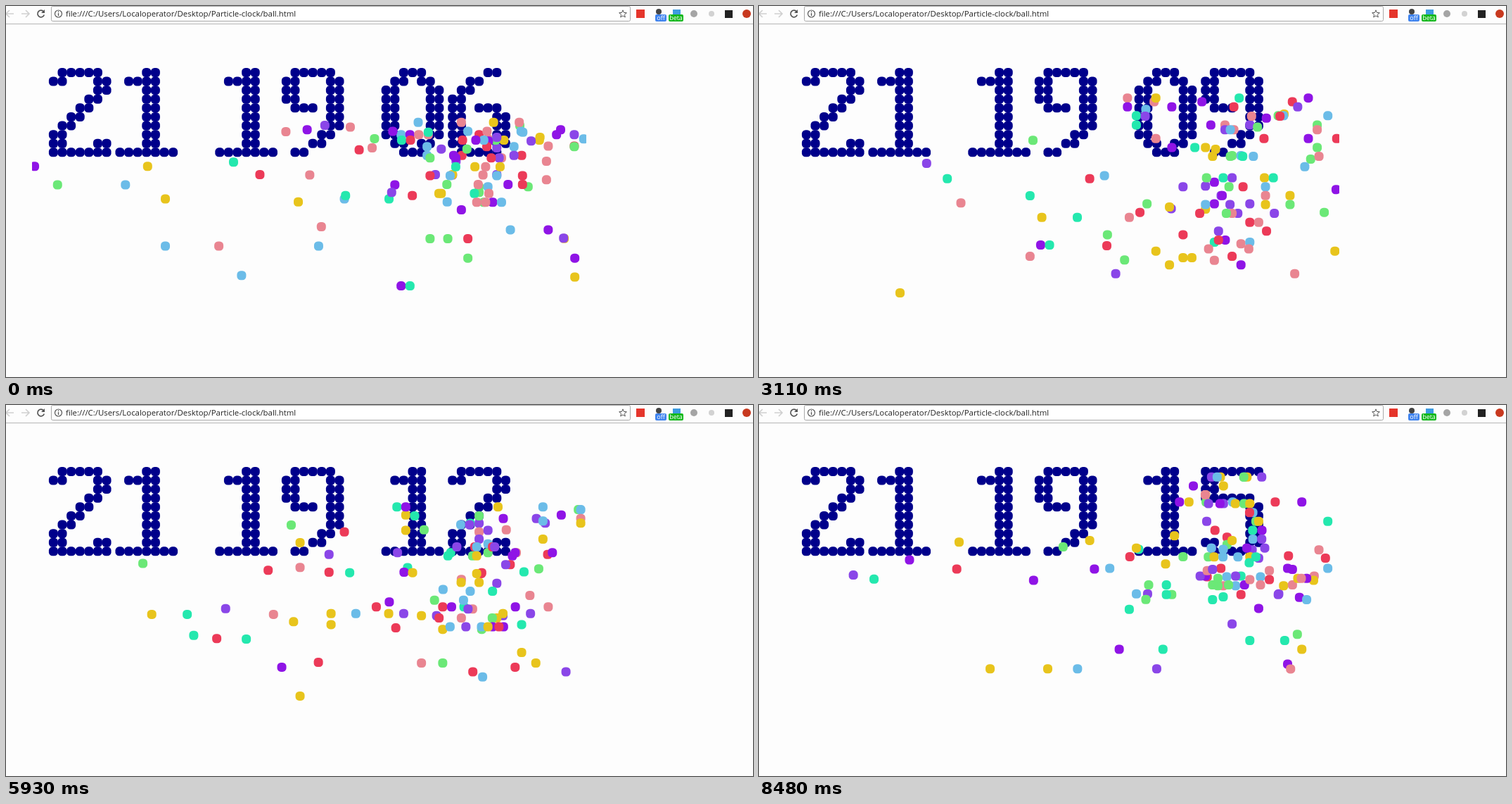
These frames come from a looping animation (1062x527 px, 8.58 s). An HTML page with a canvas:

```html
<!DOCTYPE html>
<html lang="en">
<head>
<meta charset="utf-8">
<title>Particle clock</title>
<style>
  html, body { margin: 0; width: 100%; height: 100%; overflow: hidden; background: #fdfdfd; }
  canvas, svg { position: absolute; left: 0; top: 0; display: block; }
  text { font-family: "Open Sans", "Noto Sans", sans-serif; }
</style>
</head>
<body>
<canvas id="stage" width="1062" height="527"></canvas>
<svg width="1062" height="27" viewBox="0 0 1062 27" fill="none">
  <path d="M0 25.5H1062" stroke="#b6b6b6"/>
  <rect x="64.5" y="0.5" width="823" height="21" rx="2" fill="#fff" stroke="#a9a9a9"/>
  <g stroke="#d0d0d0" stroke-width="1.6">
    <path d="M11 11H0M5 6L0 11L5 16"/>
    <path d="M22 11H33M28 6L33 11L28 16"/>
  </g>
  <path d="M53.5 8A4.8 4.8 0 1 0 54.3 12.5" stroke="#555" stroke-width="1.7"/>
  <path d="M55 5V10H50Z" fill="#555"/>
  <circle cx="74.5" cy="11" r="5" stroke="#555" stroke-width="1.2"/>
  <path d="M74.5 10V14M74.5 7.6V9" stroke="#555" stroke-width="1.3"/>
  <text x="85" y="15" font-size="11.4" fill="#222">file:///C:/Users/Localoperator/Desktop/Particle-clock/ball.html</text>
  <path d="M877 5.8L878.5 9.4L882.3 9.7L879.4 12.2L880.3 15.9L877 13.9L873.7 15.9L874.6 12.2L871.7 9.7L875.5 9.4Z" stroke="#555"/>
  <rect x="896" y="5" width="12" height="12" fill="#e5352b"/>
  <circle cx="928" cy="8" r="4" fill="#444"/>
  <rect x="948" y="5" width="11" height="7" fill="#3d9be0"/>
  <rect x="923" y="12" width="16" height="10" rx="2" fill="#3f83ee"/>
  <rect x="942" y="12" width="21" height="10" rx="2" fill="#13b81c"/>
  <g fill="#fff" font-size="9" text-anchor="middle">
    <text x="931" y="20">off</text>
    <text x="952.5" y="20">beta</text>
  </g>
  <circle cx="978" cy="11" r="5" fill="#a5a5a5"/>
  <circle cx="1003" cy="11" r="4" fill="#d2d2d2"/>
  <rect x="1022" y="6" width="11" height="11" fill="#222"/>
  <circle cx="1053" cy="11" r="6" fill="#c8391f"/>
</svg>
<script>
const ctx = document.getElementById('stage').getContext('2d');
const LOOP = 8580, SCALE = 0.788, PITCH = 16 * SCALE;
const LEFT = 67.4, TOP = 94.4;
const STEP_MS = 48.5, STEPS_PER_SEC = 20, FIRST_STEP = 135.25;
const GRAVITY = 2, BOUNCE = 0.9, FLOOR = 372, MAX_AGE = 200;
const COLORS = ['#ec3a58', '#e98591', '#8f14e6', '#8a46e8', '#6bbce8', '#6be877', '#24e8ae', '#e8c41c'];

// Digits as strokes of a brush two dots wide; each corner is column, row.
const DIGITS = [
  '20 02 07 29 39 57 52 30 20',
  '11 31,30 39,09 59',
  '01 10 40 51 52 07 09 59 58',
  '00 50 51 33 24 34 56 58 49 19 08',
  '49 40 04 05 55,39 59',
  '50 00 03 43 54 58 49 19 08',
  '40 40,21 03 08 19 49 58 55 44 34',
  '01 00 50 51 42 43 34 35 26 29',
  '44 53 51 40 10 01 03 14 44 55 58 49 19 08 05 14',
  '24 14 03 01 10 40 51 56 38,19 19'
].map(toDots);

function toDots(strokes) {
  const dots = new Set();
  for (const stroke of strokes.split(',')) {
    const points = stroke.split(' ').map(p => [...p].map(Number));
    for (let i = 1; i < points.length; i++) {
      const [x, y] = points[i - 1], dx = points[i][0] - x, dy = points[i][1] - y;
      const n = Math.max(Math.abs(dx), Math.abs(dy));
      for (let k = 0; k <= n; k++) {
        const f = n ? k / n : 0, cell = (y + dy * f) * 7 + x + dx * f;
        dots.add(cell).add(cell + 1);
      }
    }
  }
  return [...dots].sort((a, b) => a - b).map(cell => ({ row: Math.floor(cell / 7), col: cell % 7 }));
}

let seed = 2119;
function random() {
  seed = seed + 0x6d2b79f5 | 0;
  let h = Math.imul(seed ^ seed >>> 15, 1 | seed);
  h = h + Math.imul(h ^ h >>> 7, 61 | h) ^ h;
  return ((h ^ h >>> 14) >>> 0) / 4294967296;
}

const dotX = (slot, col) => LEFT + ((slot >> 1) * 18.75 + (slot & 1) * 7.5 + col) * PITCH;
const dotY = row => TOP + row * PITCH;

// Height per step for a ball thrown from a given row.
function makePath(row) {
  const path = [];
  let y = row * 16, v = -8;
  for (let i = 0; i <= MAX_AGE; i++) {
    path.push(TOP + y * SCALE);
    y += v;
    v += GRAVITY;
    if (y >= FLOOR && v > 0) v *= -BOUNCE;
  }
  return path;
}
const paths = Array.from({ length: 10 }, (_, row) => makePath(row));

// Sideways motion builds up over the first few steps.
const drift = age => age - 6 * (1 - Math.exp(-age / 6));

const balls = [];
function throwDigit(slot, digit, sec) {
  for (const { row, col } of DIGITS[digit]) balls.push({
    x: dotX(slot, col),
    path: paths[row],
    born: sec * STEPS_PER_SEC,
    vx: (Math.floor(random() * 9) - 4) * 0.84,
    life: 35 + random() ** 2 * (MAX_AGE - 35),
    color: COLORS[Math.floor(random() * COLORS.length)]
  });
}
for (let sec = 0; sec <= 15; sec++) {
  if (sec === 0) throwDigit(3, 9, sec);
  if (sec % 10 === 0) throwDigit(4, sec / 10, sec);
  throwDigit(5, sec % 10, sec);
}

function dot(x, y, color) {
  ctx.fillStyle = color;
  ctx.beginPath();
  ctx.roundRect(x - 6.5, y - 6.5, 13, 13, 5.2);
  ctx.fill();
}

function draw(t) {
  const step = Math.floor(FIRST_STEP + t / STEP_MS);
  const sec = Math.floor(step / STEPS_PER_SEC);
  ctx.clearRect(0, 0, 1062, 527);
  ctx.save();
  ctx.beginPath();
  ctx.rect(37, 27, 788, 399);
  ctx.clip();
  [2, 1, 1, 9, Math.floor(sec / 10), sec % 10].forEach((digit, slot) => {
    for (const { row, col } of DIGITS[digit]) dot(dotX(slot, col), dotY(row), '#00008b');
  });
  for (const b of balls) {
    const age = step - b.born;
    if (age >= 0 && age < b.life) dot(b.x + b.vx * drift(age), b.path[age], b.color);
  }
  ctx.restore();
}

const begin = performance.now();
function tick() {
  draw((performance.now() - begin) % LOOP);
  requestAnimationFrame(tick);
}
tick();
</script>
</body>
</html>
```
